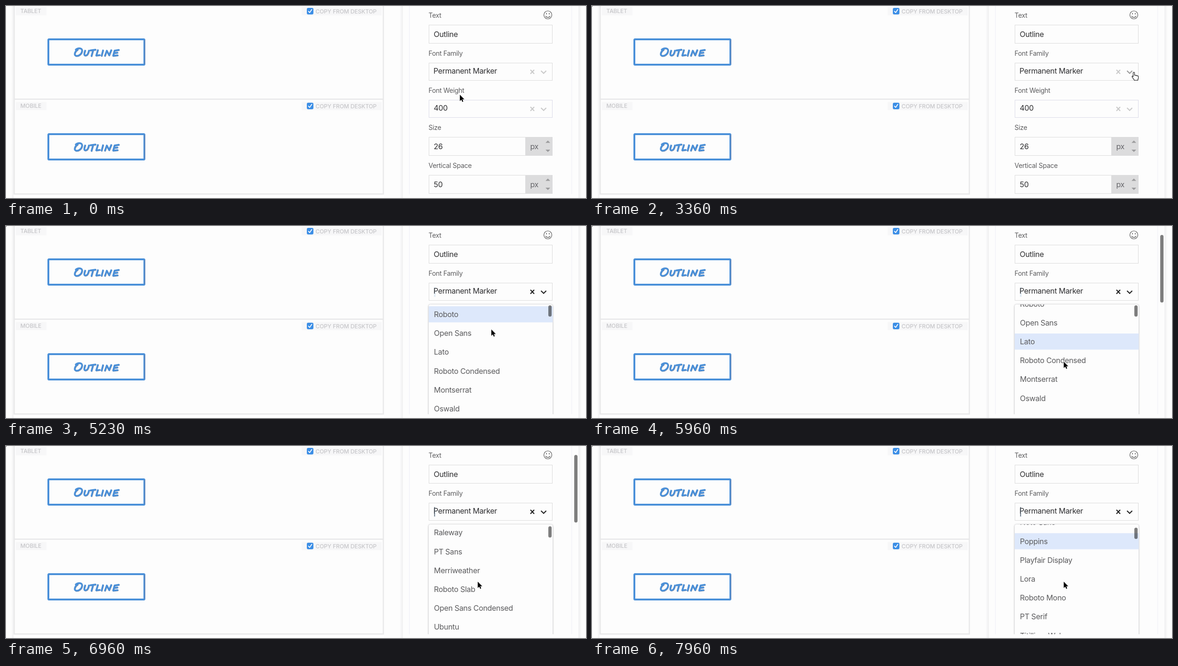
Write an HTML page that moves like this. It is 1232 by 409 pixels and loops after 8 s.

```html
<!DOCTYPE html>
<html lang="en">
<head>
<meta charset="utf-8">
<title>Font family picker</title>
<style>
html, body { margin: 0; height: 100%; overflow: hidden; background: #fdfdfd; }
svg { display: block; width: 100vw; height: 100vh; }
text { font: 16px Inter, "Open Sans", sans-serif; letter-spacing: -.02em; fill: #2e2e30; }
.label { font-size: 14px; fill: #5d5d5f; }
.tag { font-size: 12px; font-weight: 500; letter-spacing: -.01em; fill: #c6c6c9; }
.unit { fill: #66666a; }
.option { fill: #5b5b5d; }
.field { fill: #fdfdfd; stroke: #dcdcdc; }
.line { fill: none; stroke-linecap: round; stroke-linejoin: round; }
.icon { fill: none; stroke: #c9c9c9; stroke-width: 2.2; }

/* One 8 s timeline: 1% = 80 ms */
.clear, .chevron, .menu, .caret, .mark, .arrow, .hand, .dot { animation: 8s step-end infinite; }
.clear { animation-name: clear; }
.chevron { animation-name: chevron; }
.menu { animation-name: menu; }
.caret { animation-name: caret; }
.mark { animation-name: mark; }
.arrow { animation-name: arrow; }
.hand { animation-name: hand; }
.dot { animation-name: dot; }
.pointer { animation: pointer 8s linear infinite; }
.list { animation: list 8s linear infinite; }
.thumb { animation: thumb 8s linear infinite; }
.bar { animation: bar 8s linear infinite; }

@keyframes clear { 0% { stroke: #c9c9c9; } 55%, 100% { stroke: #222; } }
@keyframes chevron { 0% { stroke: #c9c9c9; } 39.4% { stroke: #999; } 55%, 100% { stroke: #222; } }
@keyframes menu { 0% { visibility: hidden; } 55%, 100% { visibility: visible; } }
@keyframes caret {
  0%, 60.6%, 73.9%, 87.1% { opacity: 0; }
  55%, 67.25%, 80.5%, 93.75%, 100% { opacity: 1; }
}
@keyframes mark {
  0% { transform: none; }
  65.9% { transform: translateY(40.2px); }
  68% { transform: translateY(80.4px); }
  93.1%, 100% { transform: translateY(603px); }
}
@keyframes arrow { 0%, 62% { opacity: 1; } 39.4% { opacity: 0; } }
@keyframes hand { 0%, 62% { opacity: 0; } 39.4% { opacity: 1; } }
@keyframes dot { 0% { opacity: 0; } .375%, 100% { opacity: 1; } }
@keyframes pointer {
  0%, 33.1% { transform: translate(964px, 189px); animation-timing-function: ease-in-out; }
  40.6%, 58.75% { transform: translate(1151px, 141px); animation-timing-function: ease-in; }
  65.375% { transform: translate(1031px, 220px); animation-timing-function: ease-out; }
  70%, 100% { transform: translate(1002px, 289px); }
}
@keyframes list {
  0%, 73.75% { transform: none; }
  74.5% { transform: translateY(-22px); animation-timing-function: ease-out; }
  82.875% { transform: translateY(-163px); animation-timing-function: ease-in-out; }
  91.25% { transform: translateY(-494.4px); }
  95.6% { transform: translateY(-496px); animation-timing-function: ease-in; }
  99.5% { transform: translateY(-588px); }
  100% { transform: translateY(-600px); }
}
@keyframes thumb {
  0%, 74.5% { transform: none; }
  82.875% { transform: translateY(1px); }
  91.25% { transform: translateY(3px); }
  99.5%, 100% { transform: translateY(5px); }
}
@keyframes bar {
  0%, 73.7% { opacity: 0; }
  74%, 87.5% { opacity: .5; }
  90.6%, 100% { opacity: 0; }
}
</style>
</head>
<body>
<svg viewBox="0 0 1232 409" preserveAspectRatio="none">
  <defs>
    <linearGradient id="shade">
      <stop stop-color="#fdfdfd"/><stop offset="1" stop-color="#efeff0"/>
    </linearGradient>
    <linearGradient id="shadeBack">
      <stop stop-color="#efeff0"/><stop offset="1" stop-color="#fdfdfd"/>
    </linearGradient>
    <filter id="soft" x="-5%" y="-5%" width="110%" height="110%">
      <feDropShadow dx="0" dy="1" stdDeviation="1.5" flood-opacity=".2"/>
    </filter>
    <clipPath id="panelClip"><rect x="850" width="350" height="401"/></clipPath>
    <clipPath id="menuClip"><rect x="898" y="167" width="263.5" height="234"/></clipPath>

    <g id="lettering" class="line">
      <path d="M148 93C152 89 161 88.500 161.500 94.500C161.500 102 154 107.500 148.500 106C143.500 104 146.500 96.500 152 93"/>
      <path d="M168 95C166 100 165 105.500 168.500 105.500C172.500 105.500 175 100 176 95"/>
      <path d="M179 94.500L190 93M185 94L181.500 106.500"/>
      <path d="M195 94L191.500 105.500L199 104.500M206 94.500L203 106"/>
      <path d="M210 106L214 95L219 105L223.500 94"/>
      <path d="M239.500 93.500L230.500 95L227.500 106L237 105M229.500 100.300L236.500 99.300"/>
    </g>

    <g id="preview">
      <rect x="21" y="2.500" width="65" height="17.500" fill="#f7f7f8"/>
      <rect x="628" y="2.500" width="170" height="17.500" fill="#f7f7f8"/>
      <rect x="639" y="4" width="14" height="14" rx="3" fill="#3d8fe6"/>
      <path class="line" d="M642.500 11.300L645 14L649.500 7.500" stroke="#fff" stroke-width="1.800"/>
      <text class="tag" x="657.500" y="16">COPY FROM DESKTOP</text>
      <rect x="90" y="71" width="204" height="54" rx="1.500" fill="#fdfdfd" stroke="#4a90d9" stroke-width="4"/>
      <path d="M295 72V124" stroke="#8888a0" stroke-width="1.500" opacity=".6"/>
      <use href="#lettering" x=".6" y=".6" stroke="#8a93a8" stroke-width="3.300"/>
      <use href="#lettering" stroke="#4a90d9" stroke-width="3.400"/>
    </g>

    <g id="stepper">
      <rect class="field" x="898.500" y="279.500" width="262" height="39"/>
      <rect x="1103" y="279" width="58" height="40" fill="#dcdcdd"/>
      <text class="unit" x="1113.500" y="305">px</text>
      <path d="M1146 291.500L1151 286.500L1156 291.500ZM1146 306L1151 311L1156 306Z" fill="#9b9b9d"/>
    </g>
    <path id="cross" d="M1114 136L1122 144.500M1122 136L1114 144.500"/>
    <path id="vee" d="M1136.500 138L1142 143.500L1147.500 138"/>
  </defs>

  <rect width="1232" height="409" fill="#fdfdfd"/>

  <!-- Previews -->
  <rect x="11" width="6" height="409" fill="url(#shade)"/>
  <rect x="16" y="401" width="787" height="8" fill="#fff"/>
  <path d="M17.500 0V400.500H801.500V0M17 198.500H802" fill="none" stroke="#e9e9ea" stroke-width="2.500"/>
  <use href="#preview"/>
  <use href="#preview" y="202"/>
  <text class="tag" x="30.500" y="15">TABLET</text>
  <text class="tag" x="30.500" y="217">MOBILE</text>

  <!-- Settings panel -->
  <rect x="836" width="7" height="409" fill="url(#shade)"/>
  <rect x="1216" width="7" height="409" fill="url(#shadeBack)"/>
  <path d="M857 0V401M1201.500 0V401" stroke="#f5f5fa" stroke-width="2"/>
  <text class="label" x="897.500" y="25">Text</text>
  <g class="line" stroke="#5a5a5a" stroke-width="1.200">
    <circle cx="1151" cy="19" r="8.500"/>
    <path d="M1146.500 21.500C1148 25.300 1154 25.300 1155.500 21.500"/>
    <path d="M1148 16.300V16.800M1154 16.300V16.800" stroke-width="2"/>
  </g>
  <rect class="field" x="898.500" y="40.500" width="262" height="39"/>
  <text x="908.500" y="66">Outline</text>
  <text class="label" x="897.500" y="106">Font Family</text>
  <rect class="field" x="898.500" y="121.500" width="262" height="37"/>
  <rect class="menu" x="909" y="130" width="3.500" height="21" fill="#e4eef6"/>
  <text x="908" y="144">Permanent Marker</text>
  <g class="menu"><rect class="caret" x="909.700" y="130" width="1.200" height="20" fill="#3f4650"/></g>
  <use href="#cross" class="icon clear"/>
  <use href="#vee" class="icon chevron"/>

  <text class="label" x="897.500" y="185">Font Weight</text>
  <rect class="field" x="898.500" y="200.500" width="262" height="37" style="stroke:#dcdce8"/>
  <text x="908.500" y="223">400</text>
  <use href="#cross" class="icon" y="79"/>
  <use href="#vee" class="icon" y="79"/>
  <text class="label" x="897.500" y="264">Size</text>
  <use href="#stepper"/>
  <text x="908.500" y="305">26</text>
  <text class="label" x="897.500" y="345">Vertical Space</text>
  <use href="#stepper" y="81"/>
  <text x="908.500" y="386">50</text>

  <!-- Font menu -->
  <g class="menu" clip-path="url(#panelClip)">
    <rect x="897.500" y="166.500" width="264" height="300" rx="4" fill="#fdfdfd" stroke="#dedee0" filter="url(#soft)"/>
    <g clip-path="url(#menuClip)">
      <g class="list" id="list">
        <rect class="mark" x="898" y="171" width="263.500" height="34.300" fill="#dde8fb"/>
      </g>
      <rect class="thumb" x="1152" y="169" width="7" height="24" rx="3.500" opacity=".5"/>
    </g>
  </g>
  <rect class="bar" x="1207" y="19" width="7" height="144" rx="3.500"/>

  <g class="pointer" stroke="#fff">
    <path class="arrow" d="M0 0V13.500L3.200 10.600L5.200 15.300L7.400 14.300L5.400 9.800H9.600Z" stroke-width="1.200" paint-order="stroke"/>
    <path class="hand" d="M-1.500 1.500a1.500 1.500 0 0 1 3 0v5.500c.5-1 2.500-1 3 .3c.6-.8 2.400-.6 2.700 .7c.8-.6 2.300-.2 2.300 1.200v3c0 2-1.200 2.800-1.200 5h-7.500c0-2-3.600-4.500-4.600-7.300c-.6-1.600 1.200-2.200 2.300-.6z" fill="#fff" stroke="#111" stroke-width="1.100"/>
  </g>
  <rect class="dot" width="1" height="1"/>
</svg>
<script>
const fonts = ["Roboto", "Open Sans", "Lato", "Roboto Condensed", "Montserrat", "Oswald",
  "Source Sans Pro", "Slabo 27px", "Raleway", "PT Sans", "Merriweather", "Roboto Slab",
  "Open Sans Condensed", "Ubuntu", "Noto Sans", "Poppins", "Playfair Display", "Lora",
  "Roboto Mono", "PT Serif", "Titillium Web"];
const list = document.getElementById("list");
fonts.forEach((name, i) => {
  const row = document.createElementNS(list.namespaceURI, "text");
  row.setAttribute("class", "option");
  row.setAttribute("x", 909);
  row.setAttribute("y", 194 + i * 40.2);
  row.textContent = name;
  list.append(row);
});
</script>
</body>
</html>
```
